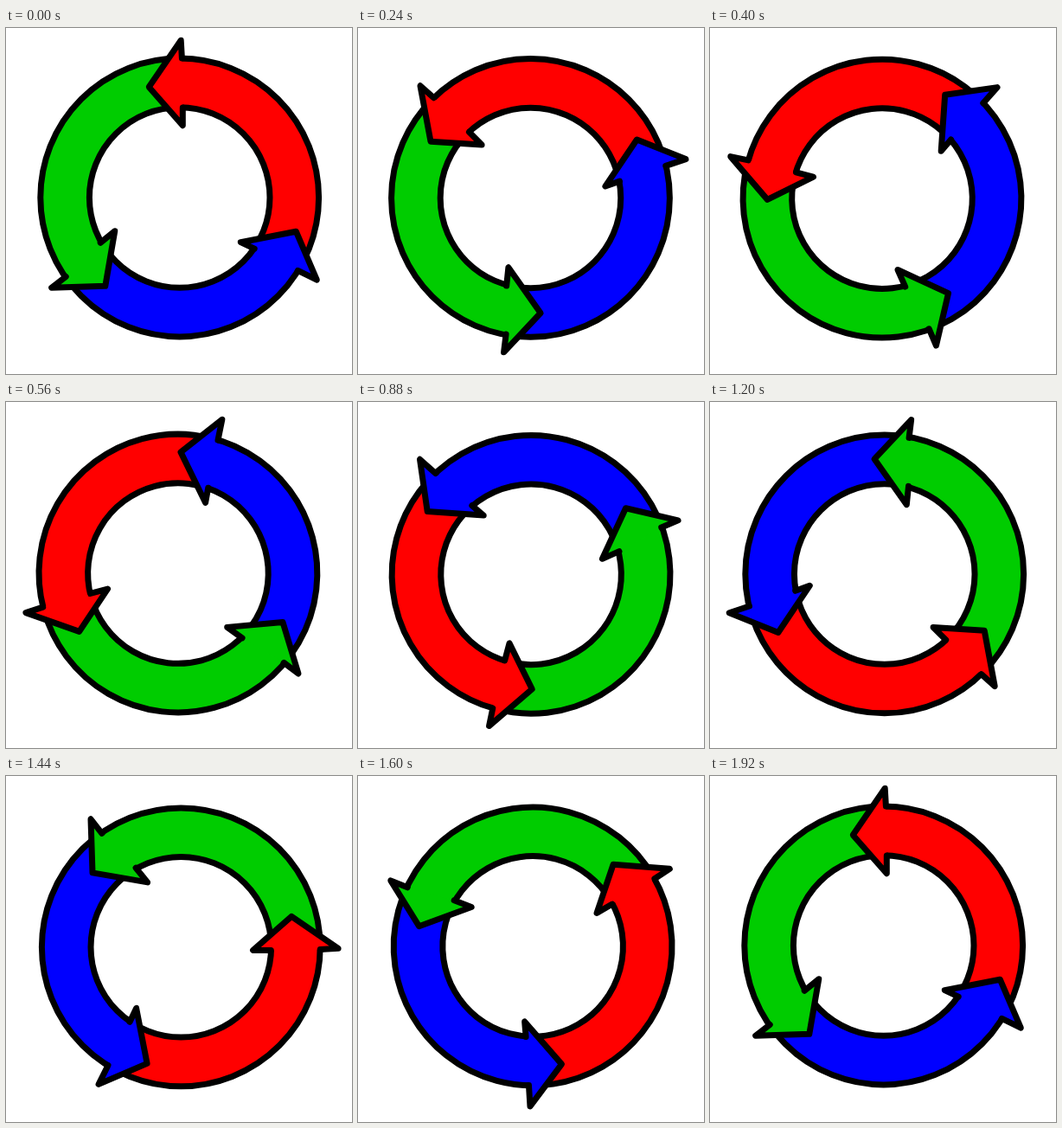
An HTML page for the animation above (2 s loop, 400 px wide and 400 px high).

```html
<!DOCTYPE html>
<html lang="en">
<head>
<meta charset="utf-8">
<title>Cycle of arrows</title>
<style>
  html, body { margin: 0; width: 100%; height: 100%; overflow: hidden; background: #fff; }
  svg { display: block; width: 100vw; height: 100vh; }
  .line { stroke: #000; stroke-width: 7; stroke-linejoin: round; stroke-linecap: round; }
</style>
</head>
<body>
<svg viewBox="0 0 400 400"><g id="wheel"></g></svg>
<script>
  const STEP_MS = 80, STEPS = 25, STEP_DEG = 15;
  const PIVOT = [200.6, 197.7];    // the ring sits slightly off this point
  const CENTER = [200.7, 196];
  const OUTER = 160.9, INNER = 104.3;

  // start: angle where the band begins under its own head (degrees, counterclockwise)
  // head: outer base, outer barb, tip, inner barb, inner base
  const arrows = [
    { color: '#f00', start: 91.5, head: '203.4,35 202.2,14.2 165.2,68.2 204.3,112.7 204.3,92' },
    { color: '#0c0', start: 217, head: '69.2,287.4 52.7,300.3 114.8,298.3 125.8,234.7 109.2,248.2' },
    { color: '#00f', start: 331.5, head: '337.4,280.3 359.3,291.2 335.3,235.2 271.3,247.7 287.2,255.2' }
  ];

  const wheel = document.getElementById('wheel');

  function add(tag, attrs) {
    const el = document.createElementNS('http://www.w3.org/2000/svg', tag);
    for (const key in attrs) el.setAttribute(key, attrs[key]);
    wheel.append(el);
  }

  function polar(radius, deg) {
    const a = deg * Math.PI / 180;
    return `${CENTER[0] + radius * Math.cos(a)} ${CENTER[1] - radius * Math.sin(a)}`;
  }

  function band(from, to) {
    return `M${polar(OUTER, from)} A${OUTER} ${OUTER} 0 0 1 ${polar(OUTER, to)}` +
      `L${polar(INNER, to)} A${INNER} ${INNER} 0 0 0 ${polar(INNER, from)}Z`;
  }

  arrows.forEach(({ color, start }, i) => {
    const previous = arrows[(i + 2) % 3].start;
    const tail = previous > start ? previous - 360 : previous;
    add('path', { d: band(start, tail), fill: color });
  });
  for (const r of [OUTER, INNER]) {
    add('circle', { cx: CENTER[0], cy: CENTER[1], r, fill: 'none', class: 'line' });
  }
  for (const { color, head } of arrows) {
    add('polyline', { points: head, fill: color, class: 'line' });
  }

  function draw(now) {
    const step = Math.floor(now / STEP_MS) % STEPS;
    wheel.setAttribute('transform', `rotate(${-STEP_DEG * step} ${PIVOT})`);
    requestAnimationFrame(draw);
  }
  draw(performance.now());
</script>
</body>
</html>
```
